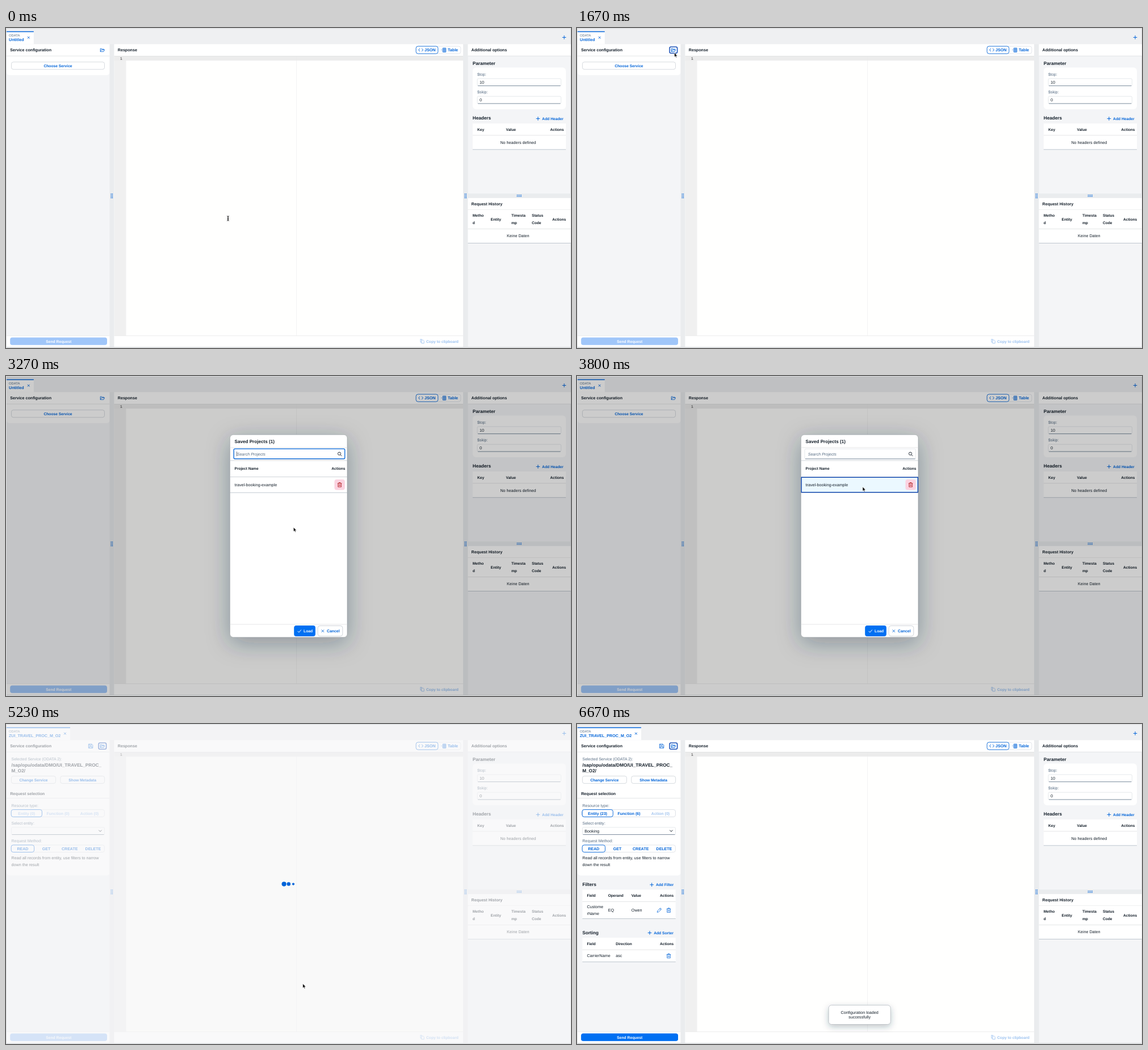
Animation, 995 px wide and 563 px high, one loop 7370 ms. Source, as an HTML page:

```html
<!DOCTYPE html>
<html lang="en">
<head>
<meta charset="utf-8">
<title>Load a saved project</title>
<style>
  html, body { margin: 0; width: 100%; height: 100%; overflow: hidden; background: #e0e2e4; }
  svg { display: block; width: 995px; height: 563px; }
  text { font-family: "Liberation Sans", Arial, sans-serif; text-rendering: geometricPrecision; white-space: pre; }
</style>
</head>
<body>
<svg id="stage" viewBox="0 0 995 563"></svg>
<script>
const LOOP = 7370;
const BLUE = '#0064d9', INK = '#131e29', LABEL = '#556b82', LINE = '#d9dbdd', EDGE = '#bcc3ca', FOCUS = '#003cae';
const FILL_BLUE = '#0070f2', PANEL = '#f4f5f7', BAR = '#eaecee';

// Shape helpers: each returns SVG markup.
const rect = (x, y, w, h, fill, extra = '') => `<rect x="${x}" y="${y}" width="${w}" height="${h}" fill="${fill}" ${extra}/>`;
const box = (x, y, w, h, stroke = EDGE, fill = '#fff', width = .6, r = 3.5) =>
  rect(x, y, w, h, fill, `rx="${r}" stroke="${stroke}" stroke-width="${width}"`);
const text = (x, y, str, { size = 7.2, color = INK, bold = 0, anchor = 'start', extra = '' } = {}) =>
  `<text x="${x}" y="${y}" font-size="${size}" fill="${color}" font-weight="${bold ? 700 : 400}" text-anchor="${anchor}" ${extra}>${str}</text>`;
const bold = (x, y, str, size = 7.14, color = INK) => text(x, y, str, { size, color, bold: 1 });
const heading = (x, y, str) => bold(x, y, str, 8.16);
const column = (x, y, str) => bold(x, y, str, 6.6);
const label = (x, y, str) => text(x, y, str, { size: 7.05, color: LABEL });
const centered = (x, y, str, size = 6.7, color = BLUE) => text(x, y, str, { size, color, bold: 1, anchor: 'middle' });
const path = (d, stroke = BLUE, width = .8, extra = '') =>
  `<path d="${d}" fill="none" stroke="${stroke}" stroke-width="${width}" stroke-linejoin="round" ${extra}/>`;
const at = (x, y, body) => `<g transform="translate(${x} ${y})">${body}</g>`;
const group = (id, body, extra = '') => `<g id="${id}" ${extra}>${body}</g>`;
const hline = (x, y, w, color = LINE) => rect(x, y, w, .7, color);
const cover = (color, opacity) => rect(1, 1, 994, 561, color, `opacity="${opacity}"`);

const plus = (x, y, r = 3.3) => path(`M${x - r} ${y}h${2 * r}M${x} ${y - r}v${2 * r}`, BLUE, 1);
const cross = (x, y, r = 1.9) => path(`M${x - r} ${y - r}l${2 * r} ${2 * r}m0 ${-2 * r}l${-2 * r} ${2 * r}`, BLUE, .9);
const addButton = (x, y, str) => plus(x, y - 2.4) + bold(x + 7.2, y, str, 6.7, BLUE);
const button = (x, y, w, str) => box(x, y, w, 13) + centered(x + w / 2, y + 8.9, str);
const field = (x, y, w, h = 12.8) => box(x, y, w, h, '#d5dae0', '#fff', .6, 2) + hline(x + 1, y + h - .4, w - 2, LABEL);
const trash = (x, y, color = BLUE) => at(x, y, path('M-3.7-2.5h7.4M-1.3-2.6v-1.2h2.6v1.2M-2.8-2.4v6.1h5.6v-6.1M-.9-.7v2.8M.9-.7v2.8', color));
const folder = at(169.8, 38.8, path('M-3.6 2.8v-5.4h2.3l.9 1h3v1.2M-3.6 2.8l1.6-3.2h5.7l-1.6 3.2z'));
const ring = box(163, 33.1, 13.6, 11.3, FOCUS, '#edf4fd', 1.3, 2.6);
const table = (x, y, w, head, row) => rect(x, y, w, head + row, '#fff') + hline(x, y + head, w) + hline(x, y + head + row, w, '#a8b3bd');

function grip(x, y, cols, rows) {
  let dots = '';
  for (let i = 0; i < cols * rows; i++)
    dots += rect(x + (i % cols) * 2.3 - cols * 1.15 + .45, y + Math.floor(i / cols) * 2.3 - rows * 1.15 + .45, 1.4, 1.4, BLUE, 'rx=".4"');
  return dots;
}

const tab = (w, name) => rect(1, 5.7, w, 22.8, '#fff') + rect(1, 5.7, w, 1.5, BLUE) +
  text(5, 15.2, 'ODATA', { size: 5.9, color: LABEL }) + bold(5, 23, name, 7.14, BLUE) + cross(w - 8.1, 16.8);
const panelHead = (x, y, w, h, tx, str) => rect(x, y, w, h, '#fff') + hline(x, y + h - .2, w) + bold(tx, y + 12.6, str);
const cardBody = h => rect(1, 49, 181.5, h, '#fff', 'rx="5"') + rect(1, 45, 181.5, 12, '#fff');

function segments(y, h, firstWidth, items) {
  return box(9.2, y, 164.2, h, '#d0d6dc') + box(9.2, y, firstWidth, h, BLUE, '#fff', .9) +
    items.map(([x, str, off]) => centered(x, y + 9, str, 7, off ? '#a2c4ef' : BLUE)).join('');
}
const resourceTypes = (entities, functions, off) => segments(150.6, 12.8, 54.2,
  [[36.2, `Entity (${entities})`, off], [91.5, `Function (${functions})`, off], [147, 'Action (0)', 1]]);

const frame = rect(0, 0, 995, 563, '#dcdee0') + rect(1, 1.5, 993, 559.5, PANEL) + rect(1, 1.5, 993, 27, '#eff0f2') + plus(983, 16.5);

const center =
  rect(182.5, 28.5, 8, 532.5, BAR) + rect(805, 28.5, 8.5, 532.5, BAR) +
  panelHead(190.5, 28.5, 614.5, 21, 196.8, 'Response') +
  rect(190.5, 50, 614.5, 491, '#fffffe') + rect(190.5, 50, 21, 491, '#f0f0f0') +
  rect(190.5, 50, 614.5, 7.3, '#ececec') + rect(511.2, 50, .6, 491, '#ececec') +
  text(200.8, 56.1, '1', { size: 6.8, color: '#333', extra: 'style="font-family:\'Liberation Mono\',monospace"' }) +
  rect(190.5, 541, 614.5, 20, '#fff') + hline(190.5, 541, 614.5, '#e5e5e5') +
  box(722.1, 32.1, 78.7, 13.1, '#d0d6dc') + box(722.1, 32.1, 38.7, 13.1, BLUE, '#fff', .85) +
  path('M729 36.1l-2.5 2.5 2.5 2.5M732 36.1l2.5 2.5-2.5 2.5', BLUE, 1) + bold(737, 41.2, 'JSON', 7.14, BLUE) +
  path('M769.3 35.3h5.3v7h-5.3zM769.3 37.6h5.3M769.3 40h5.3M772 35.3v7M767.5 38.6h-1', BLUE, .9) + bold(778, 41.2, 'Table', 7.14, BLUE) +
  group('copy', path('M731.8 549v-1.6h-1.9v5.4h1.9M731.8 549h2.8l1.6 1.7v4h-4.4z') + bold(740, 553.8, 'Copy to clipboard', 6.7, BLUE), 'opacity=".4"') +
  grip(186.3, 295.3, 2, 4) + grip(809.3, 295.3, 2, 4);

const right =
  panelHead(813.5, 28.5, 181, 20.5, 819.6, 'Additional options') + heading(821.8, 65.3, 'Parameter') +
  rect(821.8, 69.5, 164.2, 73.5, '#fff', 'rx="6"') +
  label(830, 83.9, '$top:') + field(830, 89, 147.4) + text(834, 97.7, '10') +
  label(830, 115.2, '$skip:') + field(830, 120.2, 147.4) + text(834, 128.9, '0') +
  heading(821.8, 161.3, 'Headers') + addButton(936.9, 161.8, 'Add Header') + table(821.8, 168, 164.2, 20.5, 25) +
  column(830, 180.5, 'Key') + column(880.6, 180.5, 'Value') + column(958.3, 180.5, 'Actions') +
  text(901.8, 203.7, 'No headers defined', { anchor: 'middle' }) +
  rect(813.5, 291.3, 181, 8, BAR) + grip(903.8, 295.2, 4, 2) +
  panelHead(813.5, 299.3, 181, 20.5, 819.6, 'Request History') + table(813.5, 320, 181, 33, 25) +
  [[821.8, 332.2, 'Metho'], [821.8, 345, 'd'], [853.6, 338.8, 'Entity'], [890, 332.2, 'Timesta'], [890, 345, 'mp'],
   [926, 332.2, 'Status'], [926, 345, 'Code'], [962, 338.8, 'Actions']].map(c => column(...c)).join('') +
  text(901.8, 368.3, 'Keine Daten', { anchor: 'middle' });

const leftHead = panelHead(1, 28.5, 181.5, 20.5, 7.2, 'Service configuration');
const sendButton = color => rect(7.2, 544.6, 170.8, 13.2, color, 'rx="3.8"') + centered(92.7, 553.7, 'Send Request', 6.75, '#fff');
const leftFoot = rect(1, 541, 181.5, 20, '#fff') + hline(1, 541, 181.5, '#e5e5e5') + sendButton('#a0c6f9');

const empty = tab(47.8, 'Untitled') + cardBody(34) + leftHead + button(9.5, 59.8, 164, 'Choose Service');

const service = tab(112, 'ZUI_TRAVEL_PROC_M_O2') + cardBody(217.5) + leftHead +
  path('M145.4 35.3h5.7l1.7 1.7v5.3h-7.4zM147 35.5v2.2h3.4v-2.2M147 42.2v-2.6h4.2v2.6') +
  text(9.5, 64.1, 'Selected Service (ODATA 2):', { size: 6.95, color: LABEL }) +
  heading(9.5, 75.3, '/sap/opu/odata/DMO/UI_TRAVEL_PROC_') + heading(9.5, 85.2, 'M_O2/') +
  button(9.5, 91.6, 78, 'Change Service') + button(95.8, 91.6, 77.8, 'Show Metadata') +
  bold(7.2, 125.1, 'Request selection') + hline(1, 130.3, 181.5) +
  label(9.5, 145.7, 'Resource type:') + resourceTypes(0, 0, 1) +
  label(9.5, 176.8, 'Select entity:') + field(9.5, 181.9, 164) + path('M163.3 186.7l2.6 2.6 2.6-2.6', INK, 1) +
  label(9.5, 208.2, 'Request Method:') +
  segments(212.9, 12.6, 40.4, [[29.4, 'READ'], [71, 'GET'], [112.2, 'CREATE'], [153.4, 'DELETE']]) +
  text(9.5, 238.2, 'Read all records from entity, use filters to narrow') + text(9.5, 249.6, 'down the result');

const loaded = resourceTypes(23, 6, 0) + text(13.3, 190.6, 'Booking') +
  heading(9.5, 285, 'Filters') + addButton(131.7, 285.2, 'Add Filter') + table(9.5, 291.4, 164.2, 20.8, 30) +
  column(17.5, 304.2, 'Field') + column(54.7, 304.2, 'Operand') + column(95.8, 304.2, 'Value') + column(146, 304.2, 'Actions') +
  text(17.5, 323.7, 'Custome') + text(17.5, 336.2, 'rName') + text(54.7, 330, 'EQ') + text(95.8, 330, 'Owen') +
  path('M141.2 331.3l.6-2.5 5-5 1.9 1.9-5 5zM145.6 325l1.9 1.9') + trash(161.5, 327.7) +
  heading(9.5, 369.6, 'Sorting') + addButton(128, 369.8, 'Add Sorter') + table(9.5, 376, 164.2, 20.8, 21.4) +
  column(17.5, 388.5, 'Field') + column(68.2, 388.5, 'Direction') + column(146, 388.5, 'Actions') +
  text(17.5, 410.4, 'CarrierName') + text(68.2, 410.4, 'asc') + trash(161.5, 408) + sendButton(FILL_BLUE);

const dialog = cover('#000', .2) +
  rect(394.4, 103.3, 206.6, 356.4, '#fff', 'rx="6" filter="url(#deep)"') +
  rect(394.4, 103.3, 206.6, 356.4, '#fff', 'rx="6" stroke="#8c9298" stroke-width=".6"') +
  bold(402.5, 117.6, 'Saved Projects (1)', 8.14) + hline(394.4, 125.6, 206.6) +
  field(401, 128.3, 195.6, 17.6) +
  group('searchFocus', box(401.2, 128.2, 195.5, 17.5, BLUE, '#fff', 1.3, 2) + group('caret', rect(406.3, 133, .6, 8, INK))) +
  text(406.7, 139.6, 'Search Projects', { size: 7.1, color: LABEL, extra: 'font-style="italic"' }) +
  '<circle cx="587" cy="136.6" r="2.6" fill="none" stroke="#131e29" stroke-width=".9"/>' + path('M589 138.6l2.2 2.2', INK, 1) +
  hline(394.4, 148.5, 206.6, EDGE) + column(402.5, 164.6, 'Project Name') + column(573.3, 164.6, 'Actions') +
  hline(394.4, 177.3, 206.6, EDGE) + hline(394.4, 204.8, 206.6, '#a8b3bd') +
  group('rowHover', rect(394.8, 178, 205.8, 26.8, '#f0f2f4')) +
  group('rowSelected', rect(395.2, 178.3, 205.1, 26.3, '#ebf8ff', `stroke="${FOCUS}" stroke-width="1.3"`)) +
  text(402.5, 193.6, 'travel-booking-example') + rect(578.4, 182, 18.4, 18.5, '#fbd3e1', 'rx="4"') + trash(587.6, 191.4, '#aa0808') +
  hline(394.4, 436.6, 206.6) +
  rect(507.2, 439.1, 37.7, 18.8, FILL_BLUE, 'rx="4" id="load"') + path('M513.6 448.9l2.2 2.2 4-4.6', '#fff', 1) + bold(524, 451.1, 'Load', 6.8, '#fff') +
  box(549.1, 439.4, 43.7, 18.3, EDGE, '#fff', .7, 4) + cross(557.8, 448.6, 2.2) + bold(565, 451.1, 'Cancel', 6.9, BLUE);

const busy = cover('#f5f6f7', .62) +
  [489.6, 497.8, 506].map(x => `<circle class="dot" cx="${x}" cy="281.6" fill="${BLUE}"/>`).join('');

const toast = rect(443.2, 494.7, 109, 33.8, '#fff', 'rx="5" filter="url(#soft)"') + box(443.2, 494.7, 109, 33.8, '#a9b0b7', '#fff', .7, 5) +
  text(497.7, 509.7, 'Configuration loaded', { anchor: 'middle' }) + text(497.7, 517.8, 'successfully', { anchor: 'middle' });

const shadow = (id, dy, blur, alpha) =>
  `<filter id="${id}" x="-50%" y="-50%" width="200%" height="200%"><feDropShadow dx="0" dy="${dy}" stdDeviation="${blur}" flood-color="#223548" flood-opacity="${alpha}"/></filter>`;

const beam = 'M-1.9-4.2q1.9 0 1.9 1.3V2.9q0 1.3-1.9 1.3M1.9-4.2q-1.9 0-1.9 1.3V2.9q0 1.3 1.9 1.3M-1 .9h2';
const pointer =
  group('arrow', '<path d="M0 0v7.4l1.7-1.5 1.1 2.6 1.3-.5-1.1-2.6h2.3z" fill="#000" stroke="#fff" stroke-width=".6"/>') +
  group('beam', path(beam, '#fff', 1.6) + path(beam, '#000', .8));

const stage = document.getElementById('stage');
stage.innerHTML = `<defs>${shadow('deep', 10, 20, .36)}${shadow('soft', 4, 6, .3)}</defs>` + frame +
  group('empty', empty) + group('service', service) + leftFoot + group('loaded', loaded) +
  group('hover', box(163, 33, 13.6, 11.4, EDGE, '#eaf1fa', .6, 3)) + group('ring', ring) + folder +
  center + right + group('toast', toast) + group('dialog', dialog) + group('busy', busy) + group('pointer', pointer);

const el = id => document.getElementById(id);
const show = (id, on) => el(id).setAttribute('display', on ? 'inline' : 'none');
const dots = [...stage.querySelectorAll('.dot')];

// Pointer path: [time, x, y]
const MOVES = [[0, 391, 335], [30, 391, 335], [100, 326, 180], [270, 326, 180], [1030, 172, 45], [1130, 171.5, 43.5],
  [2300, 171.5, 43.5], [2800, 506, 277], [3030, 506, 268], [3130, 506.3, 266.3], [3270, 506.3, 266.3], [3760, 503, 195],
  [4000, 503, 195], [4470, 522, 471.4], [4600, 522, 471.4], [4730, 522.7, 457], [6500, 522.7, 457], [6670, 766, 93], [LOOP, 766, 93]];

function pointerAt(t) {
  const i = MOVES.findIndex(m => m[0] > t);
  const [t0, x0, y0] = MOVES[i - 1], [t1, x1, y1] = MOVES[i];
  const u = (t - t0) / (t1 - t0), k = u * u * (3 - 2 * u);
  return [x0 + (x1 - x0) * k, y0 + (y1 - y0) * k];
}

function render(t) {
  const within = (from, to) => t >= from && t < to;
  const [x, y] = pointerAt(t);
  el('pointer').setAttribute('transform', `translate(${x} ${y})`);
  show('pointer', t < 6670);
  const overEditor = x > 190 && y > 49 && t < 1800;
  show('beam', overEditor);
  show('arrow', !overEditor);

  show('empty', t < 4770);
  show('service', t >= 4770);
  show('loaded', t >= 5530);
  show('hover', within(990, 1300));
  show('ring', within(1300, 1800) || t >= 4770);

  show('dialog', within(1800, 4770));
  show('searchFocus', within(3070, 3770));
  show('caret', (t - 3070) % 1000 < 500);
  show('rowHover', within(3400, 3770) && y < 205);
  show('rowSelected', t >= 3770);
  el('load').setAttribute('fill', t >= 4650 ? BLUE : FILL_BLUE);

  show('busy', within(4770, 5530));
  dots.forEach((dot, i) => {
    const phase = Math.max(0, t - 4810 - i * 200);
    dot.setAttribute('r', 4.1 * (.5 + .5 * Math.sin(Math.PI * phase / 800) ** 2));
  });

  show('toast', t >= 5530);
  el('toast').setAttribute('opacity', Math.min(1, Math.max(0, (t - 5500) / 100)));
}

const start = performance.now();
(function tick() {
  render((performance.now() - start) % LOOP);
  requestAnimationFrame(tick);
})();
</script>
</body>
</html>
```
